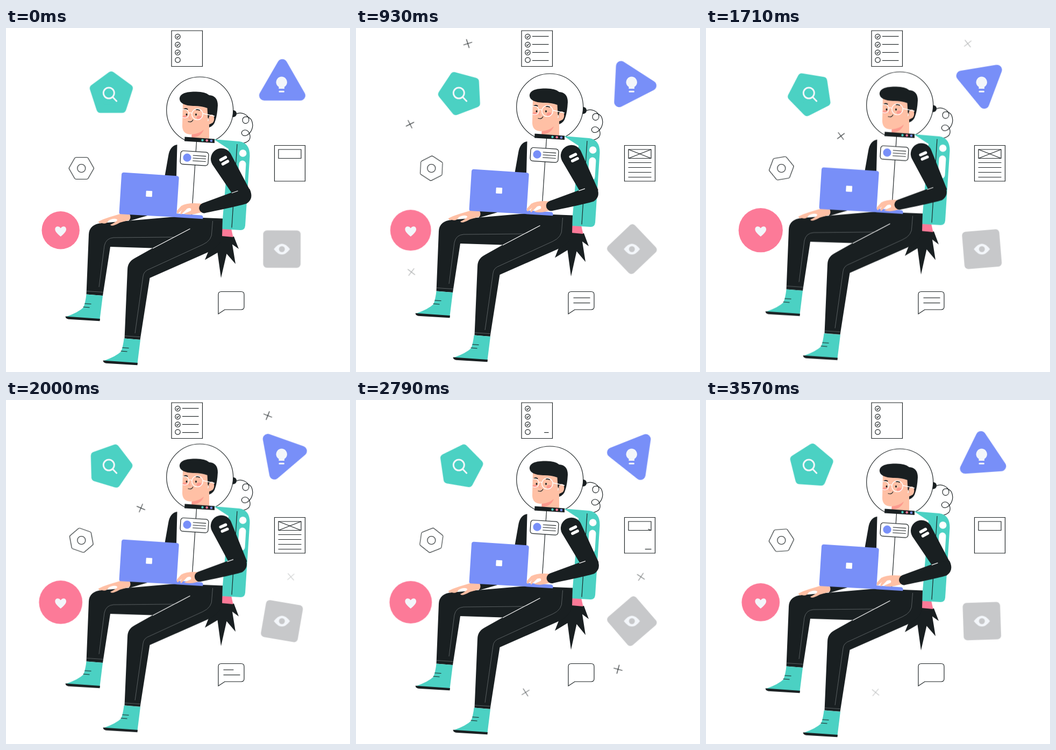
An HTML page without scripts that plays this animation: 640 px wide and 640 px high, repeating every 3.64 s.

```html
<!DOCTYPE html>
<html lang="en">
<head>
<meta charset="utf-8">
<title>Astronaut at work</title>
<style>
@property --lift { syntax: "<number>"; inherits: true; initial-value: 0; }
:root { --loop: 3640ms; --ink: #191f21; --teal: #4bd1c3; --blue: #788ff8; --pink: #fc7a98; --skin: #ffc0a5; --grey: #c7c8ca; --pale: #f3f6fa; }
html, body { margin: 0; width: 100%; height: 100%; overflow: hidden; background: #fff; }
svg { display: block; width: 100vw; height: 100vh; }

.ink { fill: var(--ink); }
.teal { fill: var(--teal); }
.blue { fill: var(--blue); }
.pink { fill: var(--pink); }
.skin { fill: var(--skin); }
.white { fill: #fff; }
.pale { fill: var(--pale); }
.line { fill: none; stroke: var(--ink); stroke-width: 1.15; }
.seam { fill: none; stroke: #5b6163; stroke-width: 1; }
.light { fill: none; stroke: #fff; stroke-width: 1.3; }
.icon { fill: none; stroke: var(--pale); stroke-width: 3; stroke-linecap: round; }
.round { stroke-linejoin: round; }

.figure { animation: lift var(--loop) linear infinite; transform: translateY(calc(var(--lift) * -9.4px)); }
.upper { transform-origin: 400px 242px; transform: rotate(calc(var(--lift) * 6deg)); }
.fore { transform: translate(calc(var(--lift) * -8.7px), calc(var(--lift) * 3px)); }
.hand { transform: translateY(calc(var(--lift) * 3px)); }
.flame { transform-origin: 400px 387px; animation: flicker var(--loop) linear infinite; }
@keyframes lift {
  0%, 100% { --lift: 0; } 11.8% { --lift: .29; } 25.5% { --lift: .64; } 39.3% { --lift: .94; }
  47.3% { --lift: 1; } 54.9% { --lift: .98; } 65.9% { --lift: .8; } 76.6% { --lift: .53; }
  87.9% { --lift: .2; } 98% { --lift: .02; }
}
@keyframes flicker {
  0%, 100% { transform: none; } 12% { transform: scaleY(1.035); } 39% { transform: scaleY(1.05); }
  55% { transform: scaleY(1.025); } 77% { transform: scaleY(1.06); } 98% { transform: scaleY(1.012); }
}

.spin { animation: spin var(--loop) linear infinite; --turn: 363deg; }
@keyframes spin { to { transform: rotate(var(--turn)); } }
.pulse { transform-origin: 101.7px 376.3px; animation: pulse calc(var(--loop) / 6) ease-in-out infinite alternate; }
@keyframes pulse { to { transform: scale(1.18); } }

.draw { stroke-dasharray: 1 3; animation: row var(--loop) linear calc(var(--i) * 210ms - var(--loop)) infinite; }
.cross { animation-name: diagonal; }
.talk { animation-name: talk; }
@keyframes row {
  0%, 2.2% { stroke-dashoffset: 1.01; } 7.97%, 55.22% { stroke-dashoffset: 0; }
  60.99%, 100% { stroke-dashoffset: -1.01; }
}
@keyframes diagonal {
  0%, 2.2% { stroke-dashoffset: 1.01; } 13.74%, 55.22% { stroke-dashoffset: 0; }
  66.76%, 100% { stroke-dashoffset: -1.01; }
}
@keyframes talk {
  0%, 58.5%, 100% { stroke-dashoffset: 1.01; } 5.5%, 52.75% { stroke-dashoffset: 0; }
}

.spark { animation: spark var(--loop) linear calc(var(--at) * 1ms - var(--loop)) infinite; }
@keyframes spark {
  0% { opacity: 0; transform: rotate(-45deg); }
  2.4%, 21.4% { opacity: 1; }
  23.8%, 100% { opacity: 0; transform: rotate(135deg); }
}
</style>
</head>
<body>
<svg viewBox="0 0 640 640">
  <defs>
    <path id="plus" class="line" d="M-8.5 0H8.5M0 -8.5V8.5"/>
    <g id="tick"><circle class="line" r="4.7"/><path class="line" d="M-2.3 0L-.5 1.9 2.6 -1.7"/></g>
    <polygon id="hex" points="-19.9,0 -9.95,-17.2 9.95,-17.2 19.9,0 9.95,17.2 -9.95,17.2"/>
    <g id="boot">
      <path class="teal" d="M149.5 495.5L180 498 174.500 542 111 537.500Q135 529 144 520 148 510 149.500 495.500Z"/>
      <path class="ink" d="M110.500 536.500L175 541 174.500 545.200 116 541.700Q111 541 110.500 536.500Z"/>
      <path class="line" d="M146.500 512.700L158.500 513.500M143.500 519L155.500 520"/>
    </g>
  </defs>

  <!-- sparks -->
  <g transform="translate(103 454)"><use href="#plus" class="spark" style="--at:100"/></g>
  <g transform="translate(100.500 179)"><use href="#plus" class="spark" style="--at:410"/></g>
  <g transform="translate(208 29)"><use href="#plus" class="spark" style="--at:800"/></g>
  <g transform="translate(251 201)"><use href="#plus" class="spark" style="--at:1240"/></g>
  <g transform="translate(487 29)"><use href="#plus" class="spark" style="--at:1680"/></g>
  <g transform="translate(530 329)"><use href="#plus" class="spark" style="--at:1980"/></g>
  <g transform="translate(487.500 501)"><use href="#plus" class="spark" style="--at:2500"/></g>
  <g transform="translate(315.500 544)"><use href="#plus" class="spark" style="--at:2730"/></g>

  <!-- checklist -->
  <path class="line" d="M308 5H365.500V71.500H308Z"/>
  <use href="#tick" x="319.500" y="16"/>
  <use href="#tick" x="319.500" y="31"/>
  <use href="#tick" x="319.500" y="45.500"/>
  <circle class="line" cx="319.500" cy="59.500" r="4.700"/>
  <g class="line">
    <path class="draw" style="--i:0" pathLength="1" d="M328 15.500H358.500"/>
    <path class="draw" style="--i:1" pathLength="1" d="M328 30.500H358.500"/>
    <path class="draw" style="--i:2" pathLength="1" d="M328 45.500H358.500"/>
    <path class="draw" style="--i:3" pathLength="1" d="M328 60.500H358.500"/>
  </g>

  <!-- document -->
  <path class="line" d="M499.500 218.500H556.500V285H499.500ZM507 226H549V242.500H507Z"/>
  <g class="line">
    <path class="draw cross" style="--i:0" pathLength="1" d="M549 226L507 242.500"/>
    <path class="draw cross" style="--i:2" pathLength="1" d="M507 226L549 242.500"/>
    <path class="draw" style="--i:0" pathLength="1" d="M506.500 250.500H549.500"/>
    <path class="draw" style="--i:1" pathLength="1" d="M506.500 259.500H549.500"/>
    <path class="draw" style="--i:2" pathLength="1" d="M506.500 268.500H549.500"/>
    <path class="draw" style="--i:3" pathLength="1" d="M506.500 277.500H549.500"/>
  </g>

  <!-- speech bubble -->
  <path class="line" d="M395 532V496Q395 490.500 400.500 490.500H437.500Q443 490.500 443 496V518.500Q443 524 437.500 524H407Z"/>
  <g class="line">
    <path class="draw talk" style="--i:0" pathLength="1" d="M404.500 502H435.500"/>
    <path class="draw talk" style="--i:1" pathLength="1" d="M404.500 511.500H435.500"/>
  </g>

  <!-- badges -->
  <g transform="translate(194.700 122.700)">
    <polygon class="teal spin round" style="--turn:-363deg" stroke="#4bd1c3" stroke-width="16" points="1.200,-33.700 33.200,-10.400 21,27.300 -18.600,27.300 -30.800,-10.400"/>
  </g>
  <circle class="icon" cx="191.300" cy="121" r="10"/>
  <path class="icon" d="M199 129L205.700 136"/>

  <g transform="translate(512.800 104.200)">
    <polygon class="blue spin round" stroke="#788ff8" stroke-width="18.800" points="1.200,-36.800 34.800,21.400 -32.400,21.400"/>
  </g>
  <path class="pale" d="M507.500 113V109.500A10.200 10.200 0 1 1 518 109.500V113Z"/>
  <path class="icon" d="M509 118.200H516.500"/>

  <circle class="pink pulse" cx="101.700" cy="376.300" r="35.200"/>
  <path class="pale" d="M101.700 388C96 383 91.300 379 91.300 374.500 91.300 368 99 367.500 101.700 372.500 104.500 367.500 112 368 112 374.500 112 379 107.500 383 101.700 388Z"/>

  <g transform="translate(513.300 411.400)">
    <rect class="spin" style="--turn:181.500deg" fill="#c7c8ca" x="-34.800" y="-34.800" width="69.600" height="69.600" rx="7"/>
    <path class="pale" d="M-15 0Q0 -20 15 0 0 20 -15 0Z"/>
    <circle fill="#c7c8ca" r="5.500"/>
  </g>

  <g transform="translate(140.300 261)">
    <g class="spin round">
      <use href="#hex" stroke="#191f21" stroke-width="7.200"/>
      <use href="#hex" fill="#fff" stroke="#fff" stroke-width="4.900"/>
    </g>
    <circle class="line" r="7.500"/>
  </g>

  <g class="figure">
    <!-- helmet and hose -->
    <path class="line" d="M428 160C438 155 450 161 452 170 452 180 440 180 440 171 441 163 452 163 457 172 462 184 456 196 447 200 438 203 435 192 443 190 452 188 457 202 452 209Q448 213 442 214"/>
    <path class="ink" d="M421 152.500Q429 153 429 159.500 429 166 421 166Z"/>
    <circle cx="360.700" cy="153" r="62" fill="#fff" stroke="#191f21" stroke-width="1.150"/>

    <!-- jet pack -->
    <path class="ink flame" d="M402 386L424 388 433 411 421 402.500 427 439 410.500 420 400 465 393.500 418 370 431.500 378 412Z"/>
    <path class="pink" d="M402 372L419 373 422.500 389 401 387Z"/>
    <path class="teal" d="M386 207L434 211Q454 214 453.500 238L445 368Q444 376.500 436 376L402 374 408 226Z"/>
    <path class="line" d="M430 216L420 371.500"/>
    <circle class="white" cx="440.700" cy="233" r="6.800"/>
    <rect class="white" x="432.500" y="246.500" width="13" height="43" rx="6.500" transform="rotate(3.500 439 268)"/>

    <!-- torso -->
    <path class="white" d="M318 214L345 206 388 208 414 225 403 356 316 353 300 270Z"/>
    <path class="ink" d="M318.500 217Q305 219 302 238L295.500 275 317 277Z"/>
    <path class="line" d="M354.500 211L345.500 349"/>
    <g transform="rotate(3.600 350.500 242.300)">
      <rect x="324.500" y="229.800" width="52" height="25" rx="5" fill="#fff" stroke="#191f21" stroke-width="1.200"/>
      <circle class="blue" cx="337" cy="242" r="7.600"/>
      <path class="line" d="M347.500 237.200H372M347.500 242.200H372M347.500 247.200H372"/>
    </g>

    <!-- head -->
    <path class="skin" d="M345.500 188V207H378V172Z"/>
    <path fill="#fd9a8e" d="M345.500 198Q359 197 368 189 363 202 348 204L345.500 204Z"/>
    <path class="skin" d="M329 138L328 183Q328.500 197 343 198 366 196 375 174L381 150Z"/>
    <path class="ink" d="M323 133C322 121 338 118 354 118.500Q371 118.500 378 125 394 126 394 144 393 162 389.500 172 387 182 378 185V176L377 168 375.500 167.500 374.500 149Q362 144.500 348 145 325 144 323 133Z"/>
    <path class="skin" d="M377 180L377.500 165Q381 159 386 162.500 389 170 385 176 381 178.500 377 180Z"/>
    <ellipse cx="333" cy="165.500" rx="4.500" ry="3" fill="#fd9a8e"/>
    <ellipse cx="359.500" cy="166.500" rx="5" ry="3.500" fill="#fd9a8e"/>
    <ellipse class="ink" cx="336" cy="161" rx="1.500" ry="2"/>
    <ellipse class="ink" cx="353.500" cy="161" rx="1.500" ry="2"/>
    <path class="line" stroke-linecap="round" style="stroke-width:2" d="M331.500 151Q334 149 337.500 151M354 152Q357 151 360 153"/>
    <path class="line" d="M338.500 174Q346 176.500 348 170.500"/>
    <path fill="none" stroke="#fd9a8e" d="M342 162L340.500 168 344 168.500"/>
    <path class="light" d="M329 152C336 150 340 154 340 159.500 340 167 333 169 328.500 166M340 158.500Q343 156.500 346 159M366 159L388 164"/>
    <circle class="light" cx="356" cy="160.500" r="10.200"/>
    <path class="ink" d="M332.500 202.500L388 206.500V214L332 210.500Z"/>
    <circle class="teal" cx="365.500" cy="208.700" r="2.200"/>
    <circle class="pink" cx="373.700" cy="209.200" r="2.200"/>
    <circle class="blue" cx="382" cy="209.800" r="2.200"/>

    <!-- legs -->
    <path class="ink" d="M403 354.500L316 351 178 363Q155 365 154 384L149.500 495.500 180 498 194 407 273 409.500 240 428Q226 435 226 450L220.500 577.500 249.500 580 267.500 465 374 418Q400 406 402 388Z"/>
    <path class="seam" d="M173 482L183 405Q186 391 200 390L312 389M240 568L255 462Q256 452 268 448L366 403Q384 395 383 378L384.500 359M150 489.500L180.500 491.500M221 572.800L250.500 574.800"/>
    <path class="light" d="M342.500 373.500L273 410"/>
    <use href="#boot"/>
    <use href="#boot" x="70" y="82"/>

    <!-- far hand and laptop -->
    <path class="ink" d="M228 345L270 347 229 359Z"/>
    <path class="skin" d="M212 346L230 346Q233 352 230 357L212 362Q196 371 194 366 205 361 207.500 357 203 352 191 358 187 366 178 363 172 364 172 360 182 355 192 352Z"/>
    <path class="blue" d="M315 345L364 348.500Q368 350 366 355.300L315 352Z"/>
    <path class="blue" d="M219.500 268.800L318 275.200Q322 275.700 321.700 279.500L317 352 213.500 346.300Q210.300 346 210.600 342.500L215 272.500Q215.500 268.500 219.500 268.800Z"/>
    <rect class="white" x="260.500" y="303" width="11.500" height="11" rx="1" transform="rotate(3 266 308)"/>

    <!-- near arm -->
    <path class="skin hand" d="M372 328Q340 323 326 331L318 340Q317 346 320 345L328 338Q322 345 326 347L337 336Q346 333 344 340L331 345.500Q341 348.500 351 346L372 341Z"/>
    <g class="upper">
      <path class="ink" d="M384 254A19.200 19.200 0 0 1 417.500 233L455 304 442 322 420 307Z"/>
      <path class="light" style="stroke-width:5.500" stroke-linecap="round" d="M399.500 245.500L408.500 240.500M403.500 253L412.500 248"/>
    </g>
    <g class="fore">
      <path class="ink" d="M365.500 326L424 304.500 453 299Q462 317 448 326.500 443 329 372 343.800A9.100 9.100 0 0 1 365.500 326Z"/>
      <path class="light" d="M420 307L431.500 303"/>
    </g>
  </g>
</svg>
</body>
</html>
```
